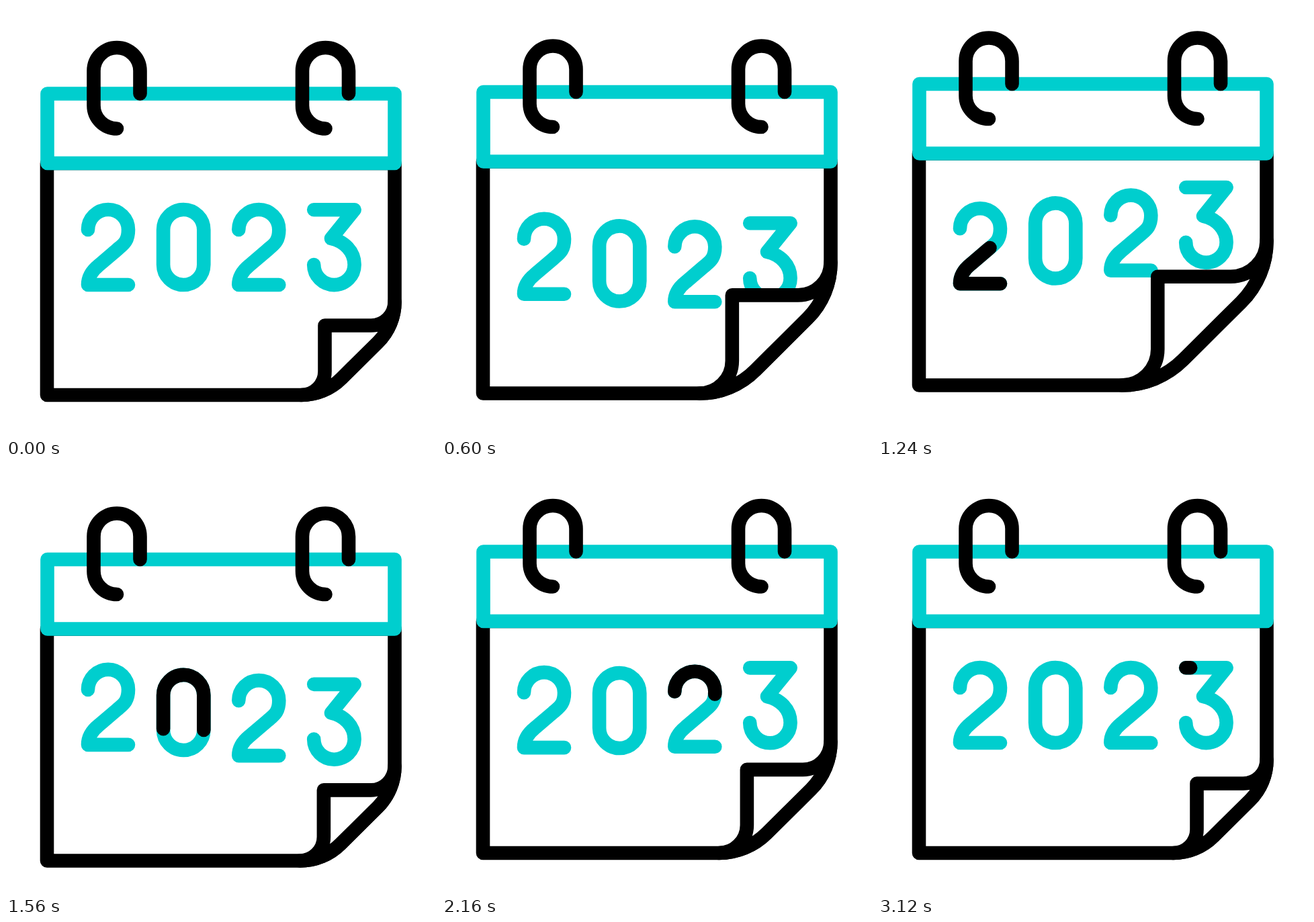
These frames come from a looping animation (640 px wide and 640 px high, 3.16 s). An HTML page:

```html
<!DOCTYPE html>
<html lang="en">
<head>
<meta charset="utf-8">
<title>Calendar 2023</title>
<style>
  html, body { margin: 0; width: 100%; height: 100%; overflow: hidden; background: #fff; }
  svg { display: block; width: 100%; height: 100%; }
  path { fill: none; stroke: #000; stroke-width: 20.6; stroke-linecap: round; stroke-linejoin: round; }
  .teal { stroke: #00cece; }
  .page { fill: #fff; }
</style>
</head>
<body>
<svg viewBox="0 0 640 640">
  <g id="calendar">
    <path id="sheet" class="page"/>
    <path class="teal page" d="M61.5 130.5H578.5V234H61.5Z"/>
    <path id="ring" d="M165 182.5A34.5 34.5 0 0 1 130.5 148V96.5A34.5 34.5 0 0 1 199.5 96.5V130.5"/>
    <use href="#ring" x="310.5"/>
    <g id="digits"></g>
    <path id="flap" class="page"/>
  </g>
</svg>
<script>
const LOOP = 3160, BEAT = 400, STAGGER = 80, SWEEP = 240;
const RIGHT = 578.5, BOTTOM = 579;

// One value per beat; smooth easing between neighbours.
const BOUNCE = [0, -32, 26.7, -15.3, 12.2, 0];
const CURL = [0, 86, 0, 60, 0, 32, 0];
const SWAY = [0, 28.5, -28, 13.9, -14.7, 8, 0];

const two = x => `M${x} 333a30 30 0 0 1 60 0c0 18-8 22-17 30l-27 23c-10 8-16 18-16 29h60`;
const DIGITS = [
  { d: two(122), sweepAt: 882 },
  { d: 'M294.3 385V333A30.1 30.1 0 0 0 234.1 333V385A30.1 30.1 0 0 0 294.3 385', sweepAt: 1413 },
  { d: two(346.3), sweepAt: 2061 },
  { d: 'M458.2 385A30.2 30.2 0 0 0 518.6 385C518.6 365 503 350 484 346L518.6 303.3H458.2', sweepAt: 2664 }
];

const byId = id => document.getElementById(id);
const clamp = v => Math.min(1, Math.max(0, v));
const smooth = v => (v = clamp(v)) * v * (3 - 2 * v);
const shift = (el, y) => el.setAttribute('transform', `translate(0 ${y})`);

function add(parent, tag, attrs = {}) {
  const el = document.createElementNS('http://www.w3.org/2000/svg', tag);
  for (const name in attrs) el.setAttribute(name, attrs[name]);
  return parent.appendChild(el);
}

function track(values, t) {
  const beat = Math.max(0, t / BEAT), i = Math.floor(beat);
  if (i >= values.length - 1) return values[values.length - 1];
  return values[i] + (values[i + 1] - values[i]) * smooth(beat - i);
}

for (const digit of DIGITS) {
  digit.group = add(byId('digits'), 'g');
  add(digit.group, 'path', { d: digit.d, class: 'teal' });
  digit.ink = add(digit.group, 'path', { d: digit.d, pathLength: 1 });
}

function drawPage(curl) {
  const x = 474.5 - curl, y = 475.5 - curl;
  const bend = 35 + 0.32 * curl, radius = bend / Math.tan(Math.PI / 8);
  const k = bend * Math.SQRT1_2;
  const edge = `A${radius} ${radius} 0 0 0 ${x + k} ${BOTTOM - k}` +
    `L${RIGHT - k} ${y + k}A${radius} ${radius} 0 0 0 ${RIGHT} ${y - bend}`;
  byId('sheet').setAttribute('d', `M61 234V${BOTTOM}H${x - bend}${edge}V234Z`);
  byId('flap').setAttribute('d',
    `M${RIGHT} ${y - bend}a${bend} ${bend} 0 0 1 ${-bend} ${bend}H${x}` +
    `V${BOTTOM - bend}a${bend} ${bend} 0 0 1 ${-bend} ${bend}${edge}`);
}

function drawDigit({ group, ink, sweepAt }, index, t) {
  shift(group, track(SWAY, t - STAGGER * (index + 1)));
  const head = smooth((t - sweepAt) / SWEEP);
  const tail = smooth((t - sweepAt - SWEEP) / SWEEP);
  ink.style.display = head > tail ? '' : 'none';
  ink.setAttribute('stroke-dasharray', `${head - tail} 2`);
  ink.setAttribute('stroke-dashoffset', -tail);
}

function render(t) {
  shift(byId('calendar'), track(BOUNCE, t));
  drawPage(track(CURL, t));
  DIGITS.forEach((digit, i) => drawDigit(digit, i, t));
}

const start = performance.now();
function tick() {
  render((performance.now() - start) % LOOP);
  requestAnimationFrame(tick);
}
render(0);
requestAnimationFrame(tick);
</script>
</body>
</html>
```
